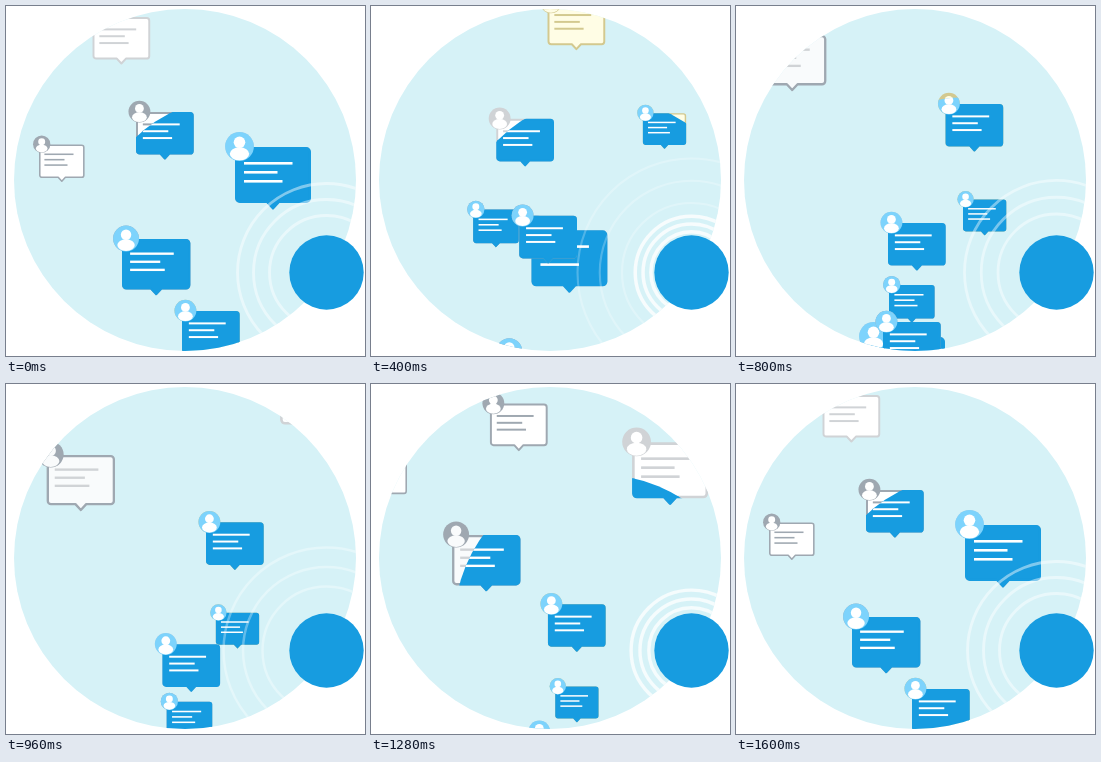
An HTML page with a canvas for the animation above (1.64 s loop, 359 by 350 pixels).

```html
<!DOCTYPE html>
<html lang="en">
<head>
<meta charset="utf-8">
<title>Message flow</title>
<style>
  html, body { margin: 0; width: 100%; height: 100%; overflow: hidden; background: #fff; }
  canvas { display: block; width: 359px; height: 350px; }
</style>
</head>
<body>
<canvas id="stage" width="359" height="350"></canvas>
<script>
const ctx = document.getElementById('stage').getContext('2d');
const LOOP = 1640, STEP = 40, CYCLE = 1600;
const KEY_TIMES = [0, 240, 560, 800, 1120, 1440];
const GREY = '#9fa8b1', PALE = '#d0d3d6', SAND = '#d3c98f';
const BLUE = '#179ce0';
const ACTIVE = { fill: BLUE, edge: BLUE, text: '#fff', badge: '#7dd3fc', skin: '#fff' };
const idle = (edge, text = edge, fill = '#fff') => ({ fill, edge, text, badge: edge, skin: fill });

// Each card passes through its points at successive key times, beginning at `start`.
const cards = [
  { size: .6, start: 4, look: idle(GREY),
    path: [[-30, 45], [11, 108], [33, 138.5], [75, 178], [127, 230.5], [153, 279], [166, 358]] },
  { size: 1, start: 3, look: idle(PALE),
    path: [[278, -45], [269, 17], [250, 102], [229, 141], [185, 188.5], [141, 263], [133, 331], [128, 420]] },
  { size: .76, start: 3, look: idle(GREY),
    path: [[114, -84], [117, -22], [122, 64], [130, 106], [144, 167], [150, 253], [147, 316], [140, 400]] },
  { size: .76, start: 5, look: idle(PALE),
    path: [[78, -31], [86.5, 11], [110, 73], [139, 153], [152, 217], [160, 304], [170, 392]] },
  { size: .9, start: 2, look: idle(GREY, PALE, '#f9fbfc'),
    path: [[0, -35], [22, 29], [60.5, 112], [101, 190], [116, 233], [128, 301], [140, 390]] },
  { size: .57, start: 0, look: idle(SAND, SAND, '#fffde5'),
    path: [[287, 10.5], [284, 70], [256, 143], [227, 193.5], [195, 265], [176, 341.5], [172, 384]] },
  { size: .76, start: 1, look: idle(SAND, SAND, '#fffde5'),
    path: [[165, -45], [188.5, 38], [209.5, 98], [186, 179], [171, 262], [176, 305], [185, 372]] }
];

const keyTime = k => KEY_TIMES[k % 6] + CYCLE * Math.floor(k / 6);

// Smooth curve through the timed points; null outside the card's lifetime.
function position({ start, path }, t) {
  const time = i => keyTime(start + i), last = path.length - 1;
  if (t < time(0) || t >= time(last)) return null;
  let i = 0;
  while (t >= time(i + 1)) i++;
  const span = time(i + 1) - time(i), u = (t - time(i)) / span;
  const slope = (n, axis) => {
    const a = Math.max(n - 1, 0), b = Math.min(n + 1, last);
    return (path[b][axis] - path[a][axis]) / (time(b) - time(a)) * span;
  };
  return [0, 1].map(axis => {
    const p = path[i][axis], q = path[i + 1][axis];
    const m = slope(i, axis), n = slope(i + 1, axis);
    return p + u * (m + u * (3 * (q - p) - 2 * m - n + u * (2 * (p - q) + m + n)));
  });
}

function disc(x, y, r, color) {
  ctx.fillStyle = color;
  ctx.beginPath();
  ctx.arc(x, y, r, 0, 7);
  ctx.fill();
}

function clipDisc(x, y, r) {
  ctx.beginPath();
  ctx.arc(x, y, r, 0, 7);
  ctx.clip();
}

function drawCard(x, y, size, look) {
  const l = 1.3, r = 74.7, b = 54.7, round = 3.5;
  ctx.save();
  ctx.translate(x, y);
  ctx.scale(size, size);

  ctx.beginPath();
  ctx.moveTo(38, l);
  ctx.arcTo(r, l, r, b, round);
  ctx.arcTo(r, b, 44, b, round);
  ctx.lineTo(44, b);
  ctx.lineTo(38, 61.2);
  ctx.lineTo(32, b);
  ctx.arcTo(l, b, l, l, round);
  ctx.arcTo(l, l, 38, l, round);
  ctx.closePath();
  ctx.lineWidth = 2.6;
  ctx.lineJoin = 'round';
  ctx.fillStyle = look.fill;
  ctx.strokeStyle = look.edge;
  ctx.fill();
  ctx.stroke();

  ctx.fillStyle = look.text;
  [48.5, 33.5, 38.5].forEach((width, i) => ctx.fillRect(9, 15 + i * 9, width, 2.6));

  ctx.translate(4.5, -.5);
  disc(0, 0, 14.4, look.badge);
  disc(0, -4.2, 5.8, look.skin);
  ctx.beginPath();
  ctx.ellipse(0, 7.3, 9.7, 6.5, 0, 0, 7);
  ctx.fill();
  ctx.restore();
}

function drawRipple(age) {
  const outer = 72 + .0923 * age - .0000372 * age * age;
  if (outer < 37 || age > 720) return;
  const fade = Math.min(1, (720 - age) / 100);
  ctx.strokeStyle = `rgba(255,255,255,${Math.min(1, .62 * Math.exp(-.0016 * age)) * fade})`;
  ctx.lineWidth = 3.2 - .0018 * age;
  for (let i = 0; i < 3; i++) {
    ctx.beginPath();
    ctx.arc(320.5, 266.5, outer - i * (outer - 25) / 4, 0, 7);
    ctx.stroke();
  }
}

function draw(t) {
  ctx.clearRect(0, 0, 359, 350);
  disc(179, 174, 171, '#d6f2f7');
  ctx.save();
  clipDisc(179, 174, 171);
  for (const card of cards) {
    for (const time of [t, t + CYCLE]) {
      const at = position(card, time);
      if (!at) continue;
      drawCard(...at, card.size, card.look);
      // Cards turn blue where they enter this fixed zone.
      ctx.save();
      clipDisc(231, 238.5, 147.5);
      drawCard(...at, card.size, ACTIVE);
      ctx.restore();
    }
  }
  [-200, 560, 1400, 2160].forEach(begin => drawRipple(t - begin));
  ctx.restore();
  disc(320.5, 266.5, 37.2, BLUE);
}

function tick() {
  const t = Math.floor(performance.now() % LOOP / STEP) * STEP;
  draw(t % CYCLE);
  requestAnimationFrame(tick);
}
tick();
</script>
</body>
</html>
```
